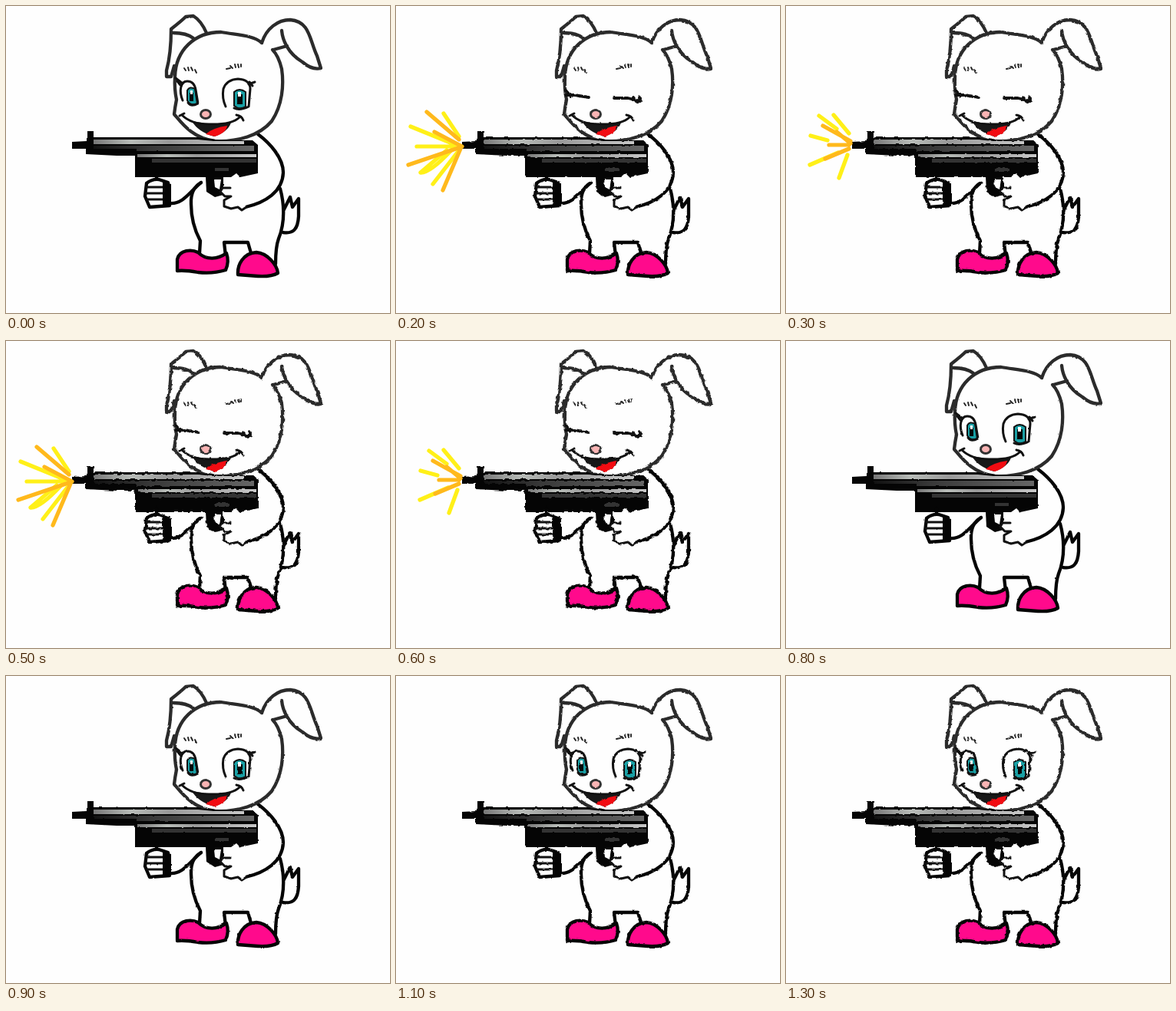
Write an HTML page that moves like this. It is 500 px wide and 400 px high and loops after 1400 ms.

```html
<!DOCTYPE html>
<html>
<head>
<meta charset="utf-8">
<style>
html, body { margin: 0; width: 100%; height: 100%; overflow: hidden; background: #fefefe; }
svg { display: block; width: 500px; height: 400px; }
path { stroke-linecap: round; stroke-linejoin: round; }
.head { stroke: #2b2b2b; stroke-width: 4.3; }
.body { stroke: #050505; stroke-width: 4.3; }
.thin { stroke: #111; stroke-width: 3; }
.hair { stroke: #222; stroke-width: 1.9; }
#shut { stroke-width: 3.8; }
#flash { stroke-width: 5.2; }
</style>
</head>
<body>
<svg viewBox="0 0 500 400" fill="none">
  <defs>
    <filter id="rough" filterUnits="userSpaceOnUse" x="0" y="0" width="500" height="400" color-interpolation-filters="sRGB">
      <feTurbulence type="fractalNoise" baseFrequency=".16" numOctaves="2" seed="3"/>
      <feDisplacementMap id="shift" in="SourceGraphic" xChannelSelector="R" yChannelSelector="G"/>
    </filter>
    <linearGradient id="steel">
      <stop stop-color="#777"/><stop offset=".25" stop-color="#b9bdb9"/>
      <stop offset=".5" stop-color="#999"/><stop offset="1" stop-color="#c8c8c8"/>
    </linearGradient>
    <linearGradient id="iron">
      <stop stop-color="#111"/><stop offset=".35" stop-color="#383838"/><stop offset="1" stop-color="#666"/>
    </linearGradient>
  </defs>
  <g filter="url(#rough)">
    <!-- torso, tail, shoes -->
    <g class="body">
      <path d="M254 230Q240 238 241 258C241 278 246 293 253 306L252 322M357 238C362 256 364 281 355 303Q351 314 351 336M286 326L284 308H315L319 322"/>
      <path d="M362 265L370 249L373 262L381 251V274C380 291 374 297 361 295"/>
      <path fill="#ff0a8c" d="M223 345V330C226 317 242 317 250 321C261 332 276 330 287 322Q291 333 286 344Q270 349 250 347Q234 344 223 345Z"/>
      <path fill="#ff0a8c" d="M302 350C301 337 309 322 326 321C340 322 353 337 354 348Q345 353 328 352Z"/>
      <path d="M328 167C344 179 361 198 361 217C360 242 338 256 312 262"/>
      <path d="M214 257C231 258 239 242 254 230"/>
    </g>
    <!-- head and ears -->
    <g class="head">
      <path fill="#fefefe" d="M333 48C322 38 302 38 280 34C246 34 221 57 220 92Q219 108 222 122Q220 132 219 141C230 154 243 172 272 176C302 177 330 169 346 150C360 129 362 103 359 82Q355 65 347 57"/>
      <path d="M261 35Q254 19 244 13L234 14Q229 19 215 30Q215 62 209 84V92H215L219 78M218 35Q235 35 244 42"/>
      <path d="M333 48C339 29 354 18 370 18C396 20 395 44 405 65L410 81Q399 84 386 73C366 61 360 43 359 32M366 52L348 57"/>
    </g>
    <path class="hair" d="M232 81l2 3M237 80l1 4M241 80l2 4M246 83l2 4M287 82l5-1M292 78l3 3M298 76l1 4M302 76l1 4M306 76v3"/>
    <g id="open" class="thin">
      <path fill="#19a0a5" stroke-width="2" d="M236 110Q239 104 246 108L249 127Q240 131 236 123ZM297 112Q304 106 312 112V131Q304 136 297 130Z"/>
      <path fill="#050505" stroke="none" d="M239 113h5v11h-5ZM301 115h7v13h-7Z"/>
      <path fill="#fff" stroke="none" d="M240 110h3v5h-3ZM302 112h4v6h-4Z"/>
      <path d="M230 123C225 111 227 98 236 98Q245 98 247 109L250 127Q241 132 237 126M286 131Q281 120 283 108Q287 96 302 95Q318 96 318 108L316 131Q304 137 297 133"/>
      <path d="M221 94L230 101M223 98l4 5M316 102L324 99M317 99l4 5"/>
    </g>
    <path id="shut" stroke="#111" d="M221 116L232 116L251 119M221 110L228 118M284 120H302L318 124M309 119L314 126M317 119V124"/>
    <ellipse cx="260" cy="141" rx="6.5" ry="5.5" fill="#f9b4b4" stroke="#333" stroke-width="3"/>
    <path fill="#181818" d="M242 150Q264 155 293 152Q289 164 271 170Q250 164 242 150Z"/>
    <path fill="#f20c12" d="M260 167Q268 159 288 156Q287 165 272 170Z"/>
    <path class="thin" d="M226 143L232 140M229 142Q241 154 264 154Q294 155 304 145M300 142Q307 143 309 149"/>
    <!-- gun -->
    <path fill="#050505" d="M86 177L105 176V172H106V163H114V171H250L280 175H321L328 181V218L305 223L300 218L293 223H168V195H144L104 193V186H86Z"/>
    <path fill="url(#steel)" d="M114 174H250L270 176H310V180H114Z"/>
    <path fill="url(#iron)" d="M114 182H323V189H170V186H114Z"/>
    <path fill="url(#steel)" d="M171 193H326V197H171Z"/>
    <path fill="#333" d="M190 199H326V204H190ZM272 211H290V215H272Z"/>
    <!-- hands -->
    <g class="body" stroke-width="3">
      <path d="M196 218V226"/>
      <path fill="#fefefe" d="M183 231Q190 225 199 226L211 230L213 260L187 262L181 248Z"/>
      <path class="thin" d="M183 236H204M182 244H204M184 252H204"/>
      <path fill="#050505" stroke="none" d="M204 229L215 232V261H204Z"/>
      <path fill="#050505" stroke="none" d="M260 223H283V246L272 249L261 242Z"/>
      <path fill="#fefefe" stroke="none" d="M271 226H280L278 239L272 236Z"/>
      <path fill="#fefefe" class="thin" d="M292 237H282L279 242L285 248H293L284 253L284 261L293 264L302 262L307 266L313 262"/>
    </g>
  </g>
  <g id="flash"><path id="yellow" stroke="#fff018"/><path id="orange" stroke="#ffb91c"/></g>
</svg>
<script>
const $ = id => document.getElementById(id);
const bursts = [
  ["M62 142L82 166M43 143L66 160M32 169L54 175M31 207L68 191M69 224L80 194",
   "M48 156L84 176M56 181H82M51 199L82 186M66 164L84 179"],
  ["M62 140L82 170M19 157L78 181M27 183H75M32 217L66 188M32 217Q44 218 72 188M48 232L82 188",
   "M40 138L82 174M50 164L86 183M16 207L84 184M61 240L84 186"],
  ["M69 134L86 170M37 147L80 179M23 175L75 177M12 200L75 181M46 225L78 187",
   "M57 142L86 180M50 154L80 182M21 213L80 184M63 215L81 194"]
];
const show = (id, on) => $(id).style.display = on ? "" : "none";
let last = -1;

function draw(now) {
  const step = Math.floor(now / 100) % 14;
  if (step !== last) {
    last = step;
    const firing = step > 0 && step < 8;
    // outlines wear a little more with each step, then start afresh
    const wear = firing ? 2 + step * 0.4 : 1.5 + Math.max(0, step - 7) * 0.3;
    $("shift").setAttribute("scale", wear);
    show("open", !firing);
    show("shut", firing);
    show("flash", firing);
    const [yellow, orange] = bursts[(3 - step % 3) % 3];
    $("yellow").setAttribute("d", yellow);
    $("orange").setAttribute("d", orange);
  }
  requestAnimationFrame(draw);
}
draw(performance.now());
</script>
</body>
</html>
```
